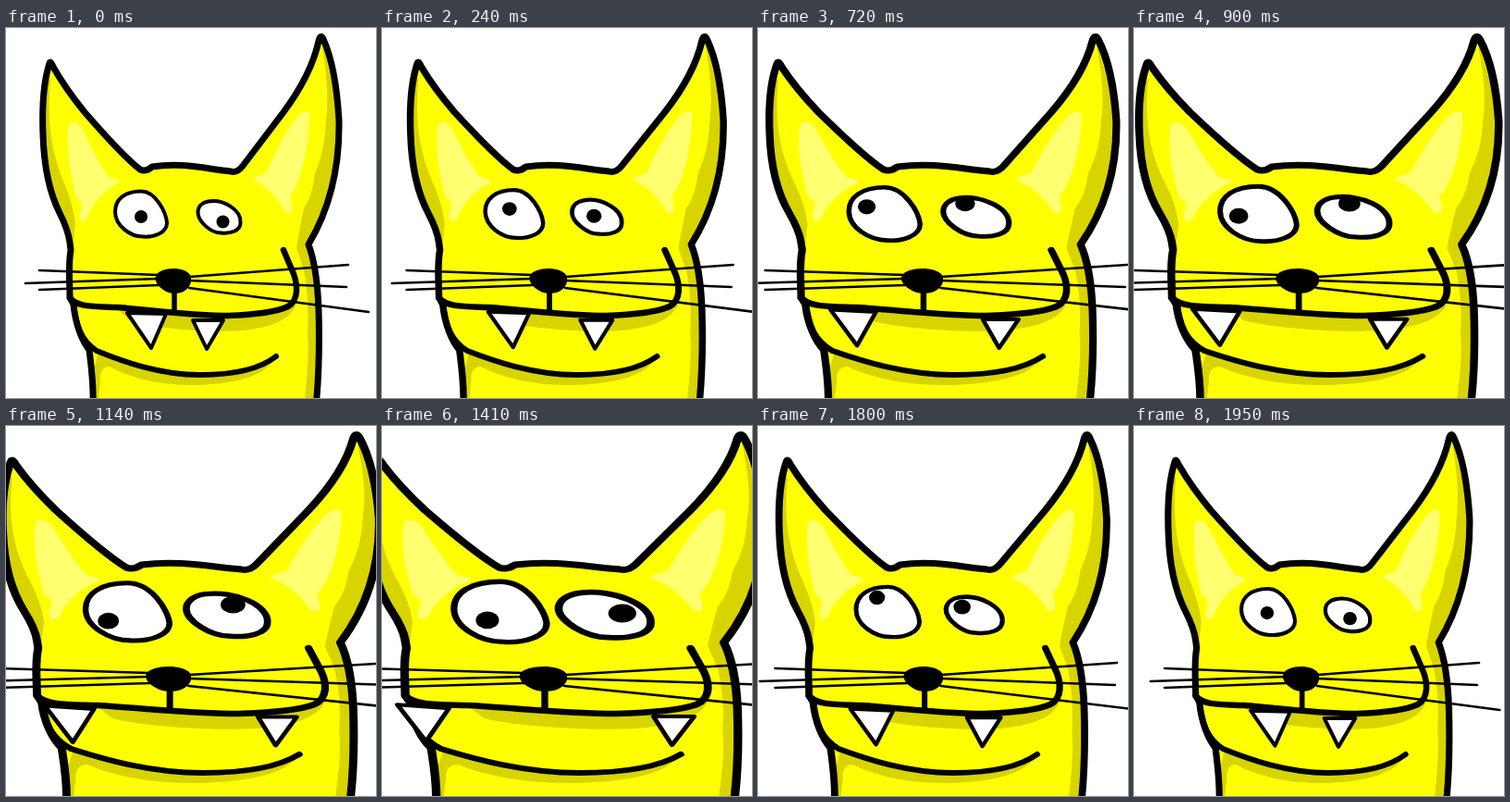
These frames come from a looping animation (400 px wide and 400 px high, 1.98 s). An HTML page:

```html
<!DOCTYPE html>
<html lang="en">
<head>
<meta charset="utf-8">
<title>Stretching cat</title>
<style>
html, body { margin: 0; width: 100%; height: 100%; overflow: hidden; background: #fff }
svg { display: block; width: 100vw; height: 100vh }
.line { fill: none; stroke: #000; stroke-linecap: round; stroke-linejoin: round }
.shade { fill: #d8d400 }
.glow { fill: #ffff70; stroke: #ffff70; stroke-width: 4; stroke-linejoin: round }
.white { fill: #fff; stroke: #000; stroke-width: 4; stroke-linejoin: round }
</style>
</head>
<body>
<svg viewBox="0 0 400 400">
  <defs>
    <path id="body" d="M47 38C40 60 39 90 40 115C41 150 47 178 58 200C64 212 68 224 69 232L70 240C67 258 69 275 69 291L73 299C75 320 82 338 90 348C92 365 95 385 94 410H335C338 380 339 340 338 305C337 275 333 250 327 234C345 204 361 160 360 100C358 65 352 32 343 12Q340 6 338 14C332 42 317 68 300 91L256 149Q250 157 243 155C215 152 190 145 158 150Q151 156 145 153C128 140 105 114 85 91C72 75 60 58 51 42Q48 35 47 38Z"/>
    <clipPath id="inside"><use href="#body"/></clipPath>
  </defs>
  <g id="cat">
    <use href="#body" fill="#ff0"/>
    <g clip-path="url(#inside)">
      <path class="shade" d="M36 50L48 56C44 100 49 132 61 163C69 182 73 195 75 212L72 240L30 200Z"/>
      <path class="shade" d="M340 8C347 50 349 75 346 100C345 125 341 140 334 157C332 175 328 186 322 195C319 210 316 224 314 238L322 262C327 290 327 310 326 330C328 355 325 380 322 410H345V240L375 150Z"/>
      <path class="shade" d="M122 305C180 312 275 316 314 297C309 316 285 324 255 327C215 330 155 324 133 316Z"/>
      <path class="shade" d="M100 350C140 371 200 380 250 373L288 360C277 378 245 384 210 386C170 387 135 379 112 366Q101 366 102 382L99 410H85Z"/>
      <path class="glow" d="M70 105Q74 101 80 109C88 125 98 147 110 163L120 166C103 175 91 190 86 205Q82 209 81 204L84 188L77 181C72 160 66 130 70 105Z"/>
      <path class="glow" d="M326 93Q322 90 315 99C303 114 292 137 283 158L270 163C288 172 297 187 304 198Q309 199 307 190L305 181C317 168 326 125 326 93Z"/>
    </g>
    <use href="#body" class="line" stroke-width="7"/>
    <path class="line" stroke-width="2.6" d="M36 262L165 267M21 276L165 271M36 283L165 278M198 269L370 256M198 273L368 280M198 281L392 307"/>
    <path class="line" stroke-width="5.5" d="M182 284V305"/>
    <path d="M162 268C166 258 193 257 199 267C203 276 196 287 182 287C171 287 159 276 162 268Z"/>
    <path class="line" stroke-width="6" d="M73 297C75 322 82 339 98 349C125 360 165 375 210 375C245 375 274 369 292 355"/>
    <path class="line" stroke-width="6.5" d="M69 292C78 302 95 301 120 302C160 305 200 311 240 311C270 310 292 307 305 301C317 294 315 277 311 266L300 240"/>
    <g id="leftEye">
      <path class="white" d="M0-25C16-25 27-2 28 9C28 20 14 25 2 24C-12 24-28 12-28-3C-28-16-18-25 0-25Z"/>
      <circle r="7"/>
    </g>
    <g id="rightEye">
      <path class="white" d="M-12-17C4-20 24-8 23 6C23 15 12 18 2 17C-10 17-23 4-23-5C-23-12-18-16-12-17Z"/>
      <circle r="7"/>
    </g>
    <path id="leftTooth" class="white" d="M131 308L173 309L157 346Z"/>
    <path id="rightTooth" class="white" d="M202 316H235L217 347Z"/>
  </g>
</svg>
<script>
const $ = id => document.getElementById(id);
const move = (el, transform) => el.setAttribute('transform', transform);
const mix = (a, b, k) => a + (b - a) * k;
const STEP = 30, STEPS = 66, PEAK = 47, LOOK_UP = 18 / PEAK;

// The pupil rolls up to `top`, then swings round to `end` on an arc bent by `bend`.
function gaze([start, top, bend, end], p) {
  if (p < LOOK_UP) return mix(start, top, (p / LOOK_UP) ** 1.2);
  const k = (p - LOOK_UP) / (1 - LOOK_UP);
  return mix(mix(top, bend, k), mix(bend, end, k), k);
}

function poseEye(id, x, y, growX, growY, pathX, pathY, p) {
  const eye = $(id);
  move(eye, `translate(${x} ${y}) scale(${1 + growX * p} ${1 + growY * p})`);
  move(eye.lastElementChild, `translate(${gaze(pathX, p)} ${gaze(pathY, p)})`);
}

function draw(now) {
  const n = Math.floor(now / STEP) % STEPS;
  const p = n <= PEAK ? n / PEAK : (STEPS - n) / (STEPS - PEAK);
  move($('cat'), `translate(200 0) scale(${1 + .335 * p} 1) translate(-200 0)`);
  poseEye('leftEye', 146, 201.5, .34, .33, [0, -12, -18.5, -7.8], [2.5, -19, 14.3, 6.3], p);
  poseEye('rightEye', 230.5, 204.5, .62, .42, [4, -13.5, 1.4, 8.8], [5, -11.2, -15.6, -1.4], p);
  move($('leftTooth'), `translate(${-70 * p} ${-5 * p}) rotate(${4 * p} 157 330)`);
  move($('rightTooth'), `translate(${68 * p} ${-2 * p})`);
}

const start = performance.now();
function tick() {
  draw(performance.now() - start);
  requestAnimationFrame(tick);
}
tick();
</script>
</body>
</html>
```
